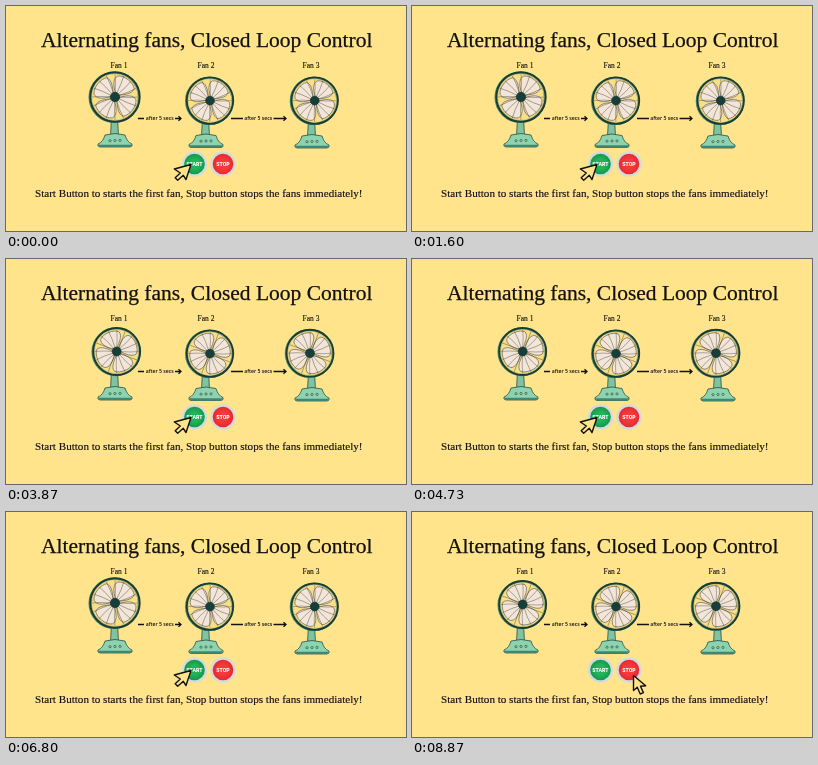
An HTML page that plays this animation: 400x225 px, repeating every 9 s.

```html
<!DOCTYPE html>
<html lang="en">
<head>
<meta charset="utf-8">
<title>Alternating fans</title>
<style>
  html, body { margin: 0; width: 100%; height: 100%; overflow: hidden; background: #ffe48c; }
  svg { display: block; width: 100vw; height: 100vh; }
  text { font-family: "Liberation Serif", serif; fill: #111; }
  .delay { font: 600 5.1px "Open Sans", sans-serif; text-anchor: middle; }
  .label { font: 900 5.2px Roboto, sans-serif; text-anchor: middle; fill: #fff; }
</style>
</head>
<body>
<svg viewBox="0 0 400 225">
  <defs>
    <radialGradient id="green"><stop offset=".4" stop-color="#25b35a"/><stop offset="1" stop-color="#0c9447"/></radialGradient>
    <radialGradient id="red"><stop offset=".4" stop-color="#f8393b"/><stop offset="1" stop-color="#e0262c"/></radialGradient>
    <g id="base" stroke="#173d38" stroke-width=".7" stroke-linejoin="round">
      <path d="M-3.5 -30L-4.5 -11H3.5L2.5 -30Z" fill="#7fc3a1"/>
      <path d="M-10 -12Q0 -15 10 -12Q12 -5 17 -3Q18 -.5 15 0H-15Q-18 -.5 -17 -3Q-12 -5 -10 -12Z" fill="#8dd3b0"/>
      <path d="M-17 -2.3H17L15 0H-15Z" fill="#3f8773" stroke="none"/>
      <g fill="#b9d3a0" stroke-width=".6">
        <circle cx="-5" cy="-6.3" r="1.1"/><circle cy="-6.5" r="1.1"/><circle cx="5" cy="-6.6" r="1.1"/>
      </g>
    </g>
    <g id="cageBack">
      <circle cx="-.8" cy=".3" r="23.7" fill="#f9df86" stroke="#4d8b70" stroke-width="2"/>
    </g>
    <g id="cageFront" fill="none">
      <g id="spokes" stroke="#3d423a" stroke-width=".4"></g>
      <circle r="22.4" stroke="#c8bd72" stroke-width=".8"/>
      <circle r="23.7" stroke="#173d38" stroke-width="1.9"/>
      <circle r="4.5" fill="#173f3a" stroke="#102d2a" stroke-width=".6"/>
    </g>
  </defs>

  <text x="35" y="41.4" font-size="21.5" stroke="#111" stroke-width=".25">Alternating fans, Closed Loop Control</text>
  <g font-size="7.5" stroke="#111" stroke-width=".12">
    <text x="104.5" y="61.8">Fan 1</text>
    <text x="191.5" y="61.8">Fan 2</text>
    <text x="296.5" y="61.8">Fan 3</text>
  </g>
  <text x="29" y="191.3" font-size="11.1" stroke="#111" stroke-width=".15">Start Button to starts the first fan, Stop button stops the fans immediately!</text>

  <g id="fans"></g>

  <text class="delay" x="153.7" y="114.4">after 5 secs</text>
  <text class="delay" x="252.2" y="114.4">after 5 secs</text>
  <path d="M132 112.5H138M169 112.5H175M172.5 110.3L175 112.5L172.5 114.7M225 112.5H237M267.5 112.5H280M277.5 110.3L280 112.5L277.5 114.7"
    fill="none" stroke="#111" stroke-width="1.3"/>

  <g stroke="#d5dadd" stroke-width="2.4">
    <circle cx="188.5" cy="158" r="11.5" fill="url(#green)"/>
    <circle cx="217" cy="158" r="11.5" fill="url(#red)"/>
  </g>
  <text class="label" x="188.5" y="159.8">START</text>
  <text class="label" x="217" y="159.8">STOP</text>

  <g fill="#ffe48c" stroke="#111" stroke-width="1.4" stroke-linejoin="round">
    <path id="startCursor" d="M168.3 163L185 158.5L180 173.5L177.3 169.3L171.7 174.3L169.2 171.8L174.3 167Z"/>
    <path id="stopCursor" d="M221.5 163.5V178.5L225.3 175.3L228.2 182L231.4 180.6L228.5 174.2L233.7 173.7Z"/>
  </g>
</svg>
<script>
const LOOP = 9000, FPS = 15, STOP_AT = 8430, BLADES = 4, SPOKES = 16;

// The bases stand still while the heads turn. Each head is x, y, scale.
const BASES = [[109, 141], [200, 141.5], [306, 142]];
const RUNNING = [[109, 91, 1.04], [204, 94.6, .98], [308.7, 94.6, .98]];
const FACING = [[110.7, 92.5, .99], [200, 94.5, .98], [309.3, 94.8, .98]];
const TURNED = [[110.7, 92.5, .99], [204, 94.6, .98], [304, 94.2, .99]];
const scenes = [
  { until: 2830, heads: RUNNING },
  { until: 3770, heads: FACING },
  { until: 5640, heads: TURNED },
  { until: STOP_AT, heads: RUNNING },
  { until: LOOP, heads: TURNED }
];

const byId = id => document.getElementById(id);
const ring = (count, item) => Array.from({ length: count }, (_, i) =>
  `<path d="${item}" transform="rotate(${i * 360 / count})"/>`).join("");

byId("spokes").innerHTML = ring(SPOKES, "M4 0Q13 1 23 0");
const petals = ring(BLADES, "M3 -1C7 -9 13 -13 17 -11C22 -7 22 5 18 9C13 11 7 5 3 1Z");

byId("fans").innerHTML = BASES.map(([x, y]) => `
  <use href="#base" x="${x}" y="${y}"/>
  <g class="head">
    <use href="#cageBack"/>
    <g class="rotor" fill="#f3e5d8" stroke="#5b564c" stroke-width=".6">${petals}</g>
    <use href="#cageFront"/>
  </g>`).join("");
const heads = document.querySelectorAll(".head");
const rotors = document.querySelectorAll(".rotor");

function draw(now) {
  const time = now % LOOP;
  const scene = scenes.find(s => time < s.until);
  // One blade pitch passes every three steps.
  const step = Math.floor(time * FPS / 1000 + .01);
  const angle = 40 + step % 3 * 360 / BLADES / 3;
  scene.heads.forEach(([x, y, scale], i) => {
    heads[i].setAttribute("transform", `translate(${x} ${y}) scale(${scale})`);
    rotors[i].setAttribute("transform", `rotate(${angle})`);
  });
  const stopped = time >= STOP_AT;
  byId("startCursor").style.display = stopped ? "none" : "";
  byId("stopCursor").style.display = stopped ? "" : "none";
}

function tick(now) {
  draw(now);
  requestAnimationFrame(tick);
}
draw(0);
requestAnimationFrame(tick);
</script>
</body>
</html>
```
